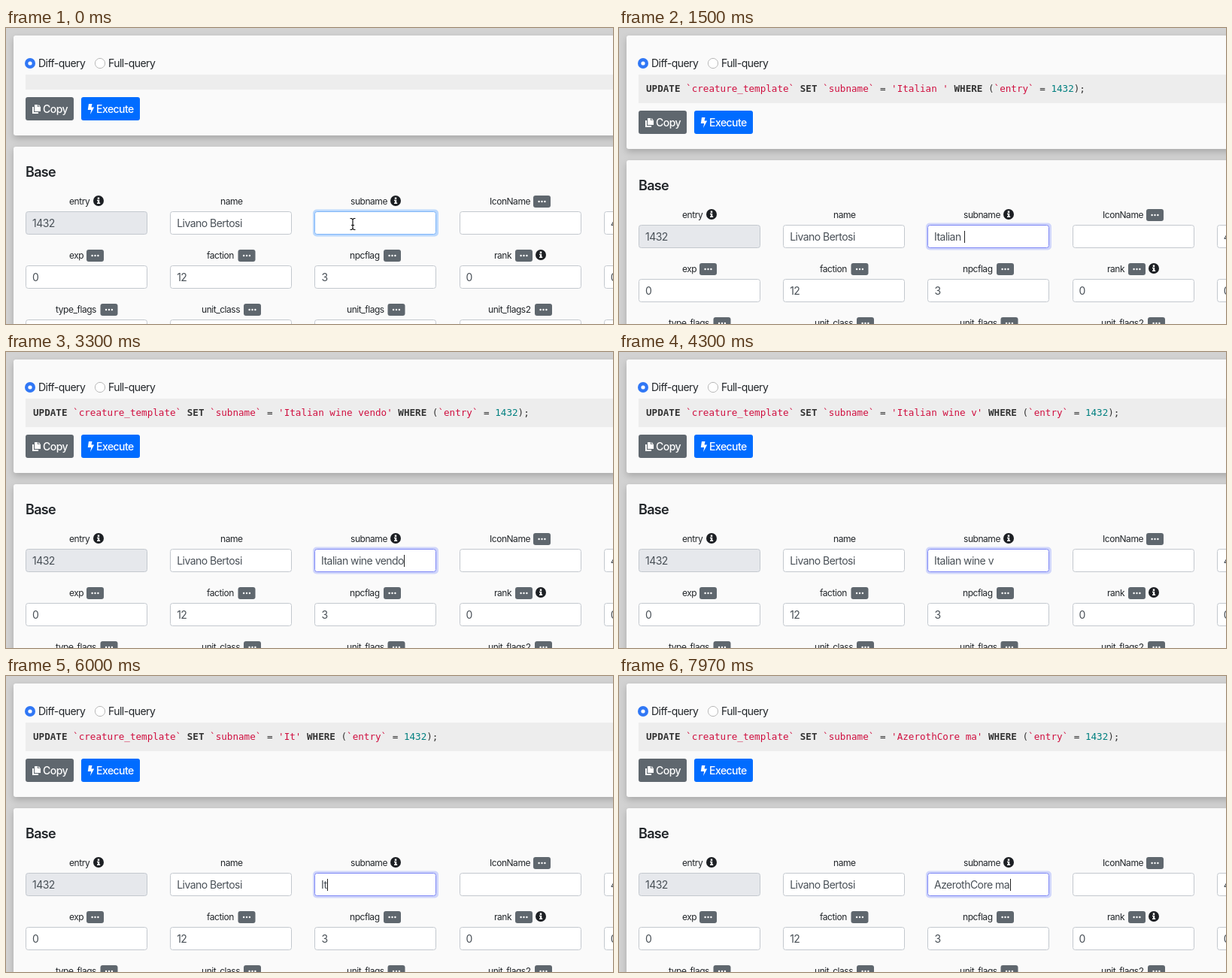
An HTML page for the animation above (8000 ms loop, 807 by 394 pixels).

```html
<!DOCTYPE html>
<html lang="en">
<head>
<meta charset="utf-8">
<title>Query editor</title>
<style>
  html, body { margin: 0; width: 100%; height: 100%; overflow: hidden; background: #d2d2d2; }
  svg { display: block; width: 100%; height: 100%; }
  text { font: 14px Inter, "Open Sans", sans-serif; letter-spacing: -.038em; white-space: pre; fill: #212529; }
  .label { font-size: 12px; }
  .title { font-size: 18px; font-weight: 600; }
  .value { fill: #495057; }
  .on { fill: #fff; font-weight: 500; }
  .sql { font: 12.6px "DejaVu Sans Mono", monospace; letter-spacing: 0; fill: #333; }
  .key { font-weight: bold; }
  .str { fill: #d01040; }
  .num { fill: #008080; }
  .card { fill: #fafafa; filter: drop-shadow(0 4px 5px rgba(0, 0, 0, .2)); }
  .field { fill: #fff; stroke: #c3c8ce; }
  .grey { fill: #5f676e; }
</style>
</head>
<body>
<svg id="stage" viewBox="0 0 807 394" preserveAspectRatio="none"></svg>
<script>
const NS = "http://www.w3.org/2000/svg";
const LOOP = 8000, GROW = 18, BLINK = 500;
const stage = document.getElementById("stage");

function add(parent, tag, attrs, text) {
  const el = document.createElementNS(NS, tag);
  for (const k in attrs) el.setAttribute(k, attrs[k]);
  if (text !== undefined) el.textContent = text;
  parent.appendChild(el);
  return el;
}
const box = (parent, x, y, width, height, attrs) =>
  add(parent, "rect", { x, y, width, height, ...attrs });
const write = (parent, x, y, text, cls = "") =>
  add(parent, "text", { x, y, class: cls }, text);
const disc = (parent, cx, cy, r, attrs) =>
  add(parent, "circle", { cx, cy, r, ...attrs });

// Query card
const queryCard = box(stage, 10, 10, 830, 133, { rx: 3, class: "card" });
disc(stage, 32, 47, 7, { fill: "#3077f5" });
disc(stage, 32, 47, 2.6, { fill: "#fff" });
write(stage, 43, 52, "Diff-query");
disc(stage, 125, 47, 6.6, { fill: "#fff", stroke: "#b9b9b9" });
write(stage, 136, 52, "Full-query");
const bar = box(stage, 26, 62, 800, 20, { fill: "#ededed" });
const sql = write(stage, 36, 85, undefined, "sql");
const span = (text, cls = "") => add(sql, "tspan", { class: cls }, text);
span("UPDATE ", "key");
span("`creature_template` ", "str");
span("SET ", "key");
span("`subname`", "str");
span(" = ");
const quoted = span("", "str");
span(" WHERE ", "key");
span("(");
span("`entry`", "str");
span(" = ");
span("1432", "num");
span(");");

// Everything below the query bar moves as one
const lower = add(stage, "g", {});
box(lower, 26, 92, 64, 31, { rx: 3, class: "grey" });
add(lower, "path", { d: "M35 105h2v7h6v2h-8z M38 102h4v3h4v6h-8z M43 102l3 2.5h-3z", fill: "#fff" });
write(lower, 49, 113, "Copy", "on");
box(lower, 100, 92, 78, 31, { rx: 3, fill: "#006cff" });
add(lower, "path", { d: "M110 101h4.5l-1 4.5h3.7l-5.2 9.5 1.2-6h-4.4z", fill: "#fff" });
write(lower, 120, 113, "Execute", "on");

box(lower, 10, 158, 830, 300, { rx: 3, class: "card" });
write(lower, 26, 198, "Base", "title");

function info(x, y) {
  disc(lower, x, y, 7, { fill: "#1c1f23" });
  add(lower, "path", { d: `M${x - 1.2} ${y - 4.4}h2.4v2.3h-2.4z M${x - 2} ${y - 1.2}h3.2v3.6h1v1.5h-4.2v-1.5h1v-2.1h-1z`, fill: "#fff" });
}
function badge(x, y) {
  box(lower, x, y - 8, 23, 16, { rx: 3, class: "grey" });
  for (const d of [-3.9, 0, 3.9]) disc(lower, x + 11.5 + d, y, 1.2, { fill: "#fff" });
}

// Each cell: label, label x, value, badge x, info x
const rows = [
  [["entry", 84, "1432", 0, 123], ["name", 285, "Livano Bertosi"], ["subname", 458, "", 0, 518],
   ["IconName", 643, "", 701], ["", 0, "4"]],
  [["exp", 84, "0", 107], ["faction", 267, "12", 308.5], ["npcflag", 457, "3", 502],
   ["rank", 649, "0", 677, 711], ["", 0, "0"]],
  [["type_flags", 66, "", 125.5], ["unit_class", 260, "", 316], ["unit_flags", 453, "", 507.5],
   ["unit_flags2", 641, "", 703], ["", 0, ""]]
];
let ring, focusBox;
rows.forEach((cells, r) => cells.forEach(([label, lx, value, bx, ix], c) => {
  const x = 26 + 192.2 * c, y = 244 + 72 * r, focused = label === "subname";
  write(lower, lx, y - 9, label, "label");
  if (bx) badge(bx, y - 13);
  if (ix) info(ix, y - 14);
  if (focused) ring = box(lower, x - 2.4, y - 2.5, 167, 36, { rx: 5 });
  const field = box(lower, Math.round(x) + .5, y + .5, 161, 30, { rx: 3, class: "field" });
  if (focused) focusBox = field;
  if (label === "entry") field.style.fill = "#e6e8ec";
  write(lower, x + 9, y + 21, value, "value");
}));
const entry = write(lower, 419, 265, "", "value");
const caret = box(lower, 420, 252, 1, 16, { fill: "#222" });
const pointer = add(lower, "g", { fill: "none" });
const beam = "M457.5 253.5h2l1.5 1.5 1.5-1.5h2 M461 255v12 M457.5 268.5h2l1.5-1.5 1.5 1.5h2 M459 262.5h4";
add(pointer, "path", { d: beam, stroke: "#fff", "stroke-width": 3 });
add(pointer, "path", { d: beam, stroke: "#111", "stroke-width": 1.2 });

// Keystrokes: the text grows or shrinks by one letter per step
const edits = [[-900, ""]];
function keys(start, step, text, from, to) {
  const dir = Math.sign(to - from);
  for (let n = from; n !== to; start += step) {
    n += dir;
    edits.push([start, text.slice(0, n)]);
  }
}
const first = "Italian wine vendor", second = "AzerothCore ma";
keys(330, 130, first, 0, 4);
keys(880, 161, first, 4, 13);
keys(2350, 84, first, 13, 19);
keys(3200, 0, first, 19, 18);
keys(3680, 32, first, 18, 14);
keys(4850, 0, first, 14, 13);
keys(5370, 60, first, 13, 1);
keys(6400, 112, second, 0, 6);
keys(7080, 125, second, 6, 14);

function draw(t) {
  const [since, text] = edits.filter(e => e[0] <= t).pop();
  const open = text !== "", shift = open ? GROW : 0;
  queryCard.setAttribute("height", 133 + shift);
  bar.setAttribute("height", 20 + shift);
  lower.setAttribute("transform", `translate(0 ${shift})`);
  sql.style.display = open ? "" : "none";
  pointer.style.display = open ? "none" : "";
  quoted.textContent = `'${text}'`;
  entry.textContent = text;
  ring.setAttribute("fill", open ? "#d0d6fb" : "#bcd9fd");
  focusBox.style.stroke = open ? "#7d86f5" : "#7db5f8";
  const end = open ? entry.getComputedTextLength() : 0;
  caret.setAttribute("x", Math.round(419.5 + end));
  caret.style.display = (t - since) % (2 * BLINK) < BLINK ? "" : "none";
}
const begin = performance.now();
function tick() {
  draw((performance.now() - begin) % LOOP);
  requestAnimationFrame(tick);
}
tick();
</script>
</body>
</html>
```
